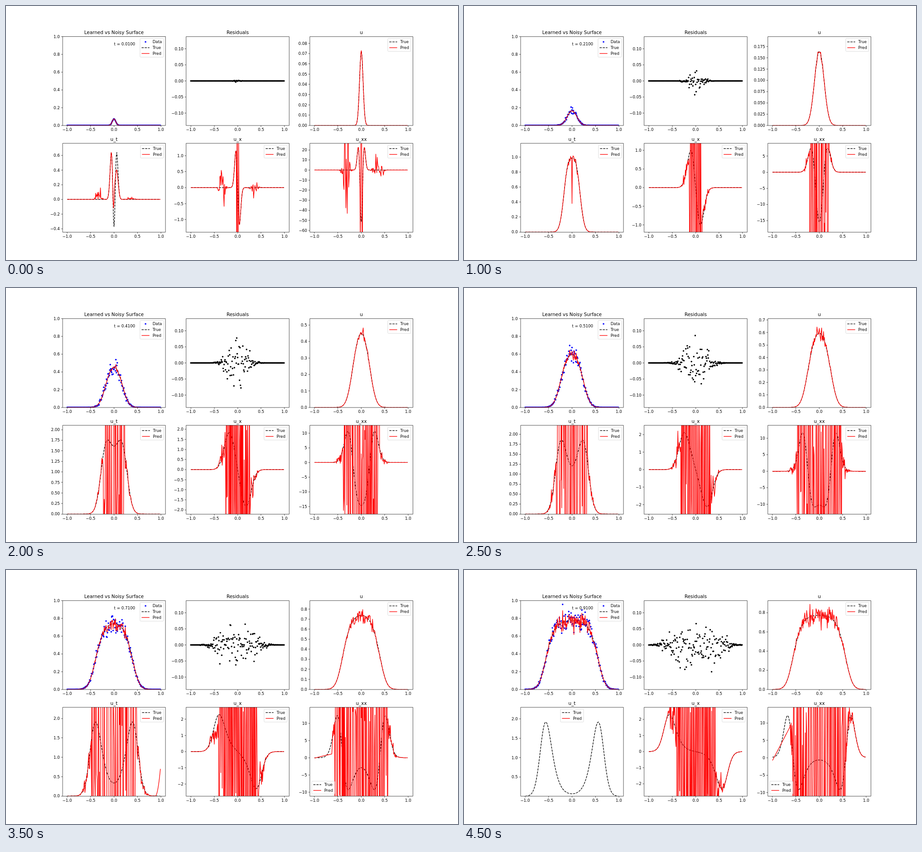
Recreate the animation shown at these times as an HTML page with a canvas. Size 998 by 561 pixels, loop 5 s.

```html
<!DOCTYPE html>
<html lang="en">
<head>
<meta charset="utf-8">
<title>Learned vs Noisy Surface</title>
<style>
html, body { margin: 0; width: 100%; height: 100%; overflow: hidden; background: #fff; }
canvas { display: block; width: 998px; height: 561px; }
</style>
</head>
<body>
<canvas id="stage"></canvas>
<script>
const W = 998, H = 561, PT = W / 1152, EM = 10 * PT;
const AXW = 227.5, AXH = 196.35, ROW = 12.75;
const FONT = '"DejaVu Sans", sans-serif';
const STEP = 500, SCENES = 10;
const canvas = document.getElementById('stage');
const ctx = canvas.getContext('2d');
const dpr = window.devicePixelRatio || 1;
canvas.width = W * dpr;
canvas.height = H * dpr;

// Reaction-diffusion: u_t = D u_xx + R u - K u^2
const D = 0.02, R = 10, K = 12.82, CELLS = 400, DX = 2 / CELLS, DT = 0.0002;
const xs = Array.from({ length: 200 }, (_, i) => -1 + i * 0.01);

// reach(t): half width of the wild zone; hold: longest run of one sign;
// fray: noise around the zone; burst: size of the early bursts
const fits = {
  ut: { reach: t => Math.min(0.49, 1.1 * (t - 0.21)), hold: 4, fray: 0.15, rim: 0.13, burst: 0.13 },
  ux: { reach: t => Math.min(0.41, 0.02 + 0.57 * t), hold: 2, fray: 0.22, rim: 0.14, burst: 0.75 },
  uxx: { reach: t => Math.min(0.57, 0.02 + 0.9 * t), hold: 2.6, fray: 0.18, rim: 0.1, burst: 70 },
};
const legendSpots = { 6: { ut: 'ul' }, 7: { uxx: 'll' }, 8: { uxx: 'lr' }, 9: { ut: 'uc', uxx: 'll' } };

function random(seed) {
  return () => {
    seed = (seed + 0x6D2B79F5) | 0;
    let v = Math.imul(seed ^ (seed >>> 15), 1 | seed);
    v = (v + Math.imul(v ^ (v >>> 7), 61 | v)) ^ v;
    return ((v ^ (v >>> 14)) >>> 0) / 4294967296;
  };
}
const gauss = rnd => Math.sqrt(-2 * Math.log(1 - rnd())) * Math.cos(2 * Math.PI * rnd());
const hump = (x, mid, width) => Math.exp(-(((x - mid) / width) ** 2));
const clamp = (v, lo, hi) => Math.max(lo, Math.min(hi, v));
const smooth = v => { const c = clamp(v, 0, 1); return c * c * (3 - 2 * c); };

function solve() {
  const n = CELLS + 1, states = [];
  let u = Float64Array.from({ length: n }, (_, i) => 0.0722 * Math.exp(-((i * DX - 1) ** 2) / 0.0028));
  const at = i => u[i < 0 ? -i : i >= n ? 2 * (n - 1) - i : i];
  const bend = i => (at(i - 1) - 2 * u[i] + at(i + 1)) / DX ** 2;
  const rate = i => D * bend(i) + R * u[i] - K * u[i] ** 2;
  const sample = f => xs.map((_, j) => f(2 * j));
  for (let s = 0; s < SCENES; s++) {
    states.push({
      u: sample(i => u[i]),
      ut: sample(rate),
      ux: sample(i => (at(i + 1) - at(i - 1)) / (2 * DX)),
      uxx: sample(bend),
    });
    for (let k = 0; k < 0.1 / DT; k++) u = u.map((v, i) => v + DT * rate(i));
  }
  return states;
}

// Smooth misfit of the time derivative: a missed dip early on, a drift at the right end later
function drift(x, t) {
  const early = Math.exp(-t / 0.02);
  const late = t > 0.55 ? 1 : 0;
  return early * (0.75 * hump(x, 0.01, 0.02) - 0.4 * hump(x, 0.06, 0.03))
    + late * Math.max(0, (x - 0.88) / 0.11) ** 2 * 0.7;
}

function learn(key, truth, span, t, seed) {
  const { reach, hold, fray, rim, burst } = fits[key];
  const rnd = random(seed), half = reach(t), early = Math.exp(-t / 0.03);
  let sign = 1, left = 0;
  return xs.map((x, i) => {
    if (Math.abs(x) < half) {
      if (left-- <= 0) {
        sign = -sign;
        left = Math.floor(rnd() * hold);
      }
      return truth[i] + sign * span * (0.4 + 1.6 * rnd());
    }
    // Late in the run the left tail of the curvature is one straight piece
    if (key === 'uxx' && t > 0.55 && x < -0.62) {
      return 0.4 * Math.exp(10.4 * (t - 0.61)) * (x + 0.97) / 0.35;
    }
    const wave = gauss(rnd);
    const bursts = early * burst * (hump(x, -0.33, 0.06) + 0.2 * hump(x, 0.36, 0.09));
    const edge = fray * t * span * Math.exp(-((x / (Math.max(half, 0) + rim)) ** 8));
    if (key === 'ut') return truth[i] + drift(x, t) + Math.abs(wave) * bursts + wave * edge;
    return truth[i] + wave * (bursts + edge);
  });
}

function prepare(truth, n) {
  const t = 0.01 + n * 0.1, rnd = random(91 + n * 17), top = Math.max(...truth.u);
  const noise = 0.012 + 0.07 * t, spread = 0.0025 + 0.033 * smooth(t / 0.45);
  const pred = { u: truth.u.map(u => u * (1 + noise * gauss(rnd) * (u / top) ** 1.2)) };
  const res = truth.u.map(u => clamp(gauss(rnd), -2.5, 2.5) * spread * (u / top) ** 0.6);
  const lim = { u: [0, 1.2 * top] };
  Object.keys(fits).forEach((key, j) => {
    const lo = 1.2 * Math.min(...truth[key]), hi = 1.2 * Math.max(...truth[key]);
    lim[key] = [lo, hi];
    pred[key] = learn(key, truth[key], hi - lo, t, 7 + n * 31 + j * 5);
  });
  if (n === SCENES - 1) pred.ut = null; // the last time step has no learned rate
  const data = pred.u.map((v, i) => v - res[i]);
  return { truth, pred, res, lim, data, spots: legendSpots[n] || {}, time: t.toFixed(4) };
}

// The plot grid is 1600 by 900; straight rules sit on its pixel centres
const snapX = x => (Math.floor(x * 1600 / W + 0.01) + 0.5) * W / 1600;
const snapY = y => (Math.floor(y * 900 / H + 0.01) + 0.5) * H / 900;
const signed = (v, places) => (v < 0 ? '\u2212' : '') + Math.abs(v).toFixed(places);

function text(str, x, y, align = 'left', size = EM) {
  ctx.font = `${size}px ${FONT}`;
  ctx.textAlign = align;
  ctx.fillStyle = '#000';
  ctx.fillText(str, x, y);
}

function stroke(points, color, dashed) {
  ctx.beginPath();
  points.forEach(([x, y]) => ctx.lineTo(x, y));
  ctx.strokeStyle = color;
  ctx.lineWidth = 1.5 * PT;
  ctx.lineJoin = 'round';
  ctx.setLineDash(dashed ? [5.55 * PT, 2.4 * PT] : []);
  ctx.stroke();
  ctx.setLineDash([]);
}

function dot(x, y, color) {
  ctx.beginPath();
  ctx.arc(x, y, 2 * PT, 0, 2 * Math.PI);
  ctx.fillStyle = color;
  ctx.fill();
}

function ticks([lo, hi]) {
  const raw = (hi - lo) / 9, base = 10 ** Math.floor(Math.log10(raw));
  const step = [1, 2, 2.5, 5, 10].find(s => s * base >= raw * 0.9999) * base;
  const whole = p => Math.abs(step * 10 ** p - Math.round(step * 10 ** p)) < 1e-6;
  const places = [0, 1, 2, 3, 4].find(whole);
  const edge = 0.5 * (hi - lo) / AXH, list = [];
  for (let k = Math.ceil((lo - edge) / step); k * step <= hi + edge; k++) {
    list.push([k * step, signed(k * step, places)]);
  }
  return list;
}

function legend(left, top, names, spot) {
  const w = (names.length > 2 ? 6 : 5.89) * EM, h = names.length * ROW + 3.1, pad = EM / 2;
  const x = { l: left + pad, c: left + (AXW - w) / 2, r: left + AXW - pad - w }[spot[1]];
  const y = spot[0] === 'u' ? top + pad : top + AXH - pad - h;
  ctx.beginPath();
  ctx.roundRect(x, y, w, h, 0.2 * EM);
  ctx.fillStyle = 'rgba(255,255,255,.8)';
  ctx.fill();
  ctx.strokeStyle = 'rgba(204,204,204,.8)';
  ctx.lineWidth = PT;
  ctx.stroke();
  names.forEach((name, i) => {
    const x0 = x + 0.4 * EM, cy = y + 7.7 + i * ROW, isTrue = name === 'True';
    if (name === 'Data') dot(x0 + EM, cy, '#00f');
    else stroke([[x0, cy], [x0 + 2 * EM, cy]], isTrue ? '#000' : '#f00', isTrue);
    text(name, x0 + 2.8 * EM, cy + 3.1);
  });
}

function panel(col, row, title, lim, layers, names, spot = 'ur', note) {
  const left = 124.75 + col * 273, top = 67.32 + row * 235.62, bottom = top + AXH;
  const px = x => left + AXW * (x + 1.1) / 2.2;
  const py = y => bottom - AXH * (y - lim[0]) / (lim[1] - lim[0]);
  ctx.save();
  ctx.beginPath();
  ctx.rect(left, top, AXW, AXH);
  ctx.clip();
  for (const { ys, color, kind } of layers) {
    if (!ys) continue;
    const points = ys.map((y, i) => [px(xs[i]), py(y)]);
    if (kind === 'dots') points.forEach(([x, y]) => dot(x, y, color));
    else stroke(points, color, kind === 'dash');
  }
  ctx.restore();

  const x0 = snapX(left), y0 = snapY(top), y1 = snapY(bottom);
  ctx.strokeStyle = '#000';
  ctx.lineWidth = 0.8 * PT;
  ctx.strokeRect(x0, y0, snapX(left + AXW) - x0, y1 - y0);
  ctx.beginPath();
  for (const [v, label] of ticks(lim)) {
    const y = snapY(py(v));
    ctx.moveTo(x0, y);
    ctx.lineTo(x0 - 3.5 * PT, y);
    text(label, left - 7 * PT, py(v) + 3.2, 'right');
  }
  for (let v = -1; v <= 1; v += 0.5) {
    const x = snapX(px(v));
    ctx.moveTo(x, y1);
    ctx.lineTo(x, y1 + 3.5 * PT);
    text(signed(v, 1), px(v), bottom + 12.8, 'center');
  }
  ctx.stroke();
  text(title, left + AXW / 2, top - 6 * PT, 'center', 12 * PT);
  if (note) text(note, px(0), py(0.9));
  if (names) legend(left, top, names, spot);
}

function draw({ truth, pred, res, lim, data, spots, time }) {
  ctx.setTransform(dpr, 0, 0, dpr, 0, 0);
  ctx.fillStyle = '#fff';
  ctx.fillRect(0, 0, W, H);
  const both = ['True', 'Pred'];
  const pair = key => [
    { ys: truth[key], color: '#000', kind: 'dash' },
    { ys: pred[key], color: '#f00', kind: 'line' },
  ];
  const dots = (ys, color) => ({ ys, color, kind: 'dots' });
  panel(0, 0, 'Learned vs Noisy Surface', [0, 1], [dots(data, '#00f'), ...pair('u')],
    ['Data', ...both], 'ur', `t = ${time}`);
  panel(1, 0, 'Residuals', [-0.138, 0.138], [dots(res, '#000')]);
  panel(2, 0, 'u', lim.u, pair('u'), both);
  ['ut', 'ux', 'uxx'].forEach((key, col) => {
    panel(col, 1, key.replace('u', 'u_'), lim[key], pair(key), both, spots[key]);
  });
}

const views = solve().map(prepare);
const start = performance.now();
let shown = -1;
function tick() {
  const n = Math.floor((performance.now() - start) / STEP) % SCENES;
  if (n !== shown) draw(views[shown = n]);
  requestAnimationFrame(tick);
}
tick();
</script>
</body>
</html>
```
